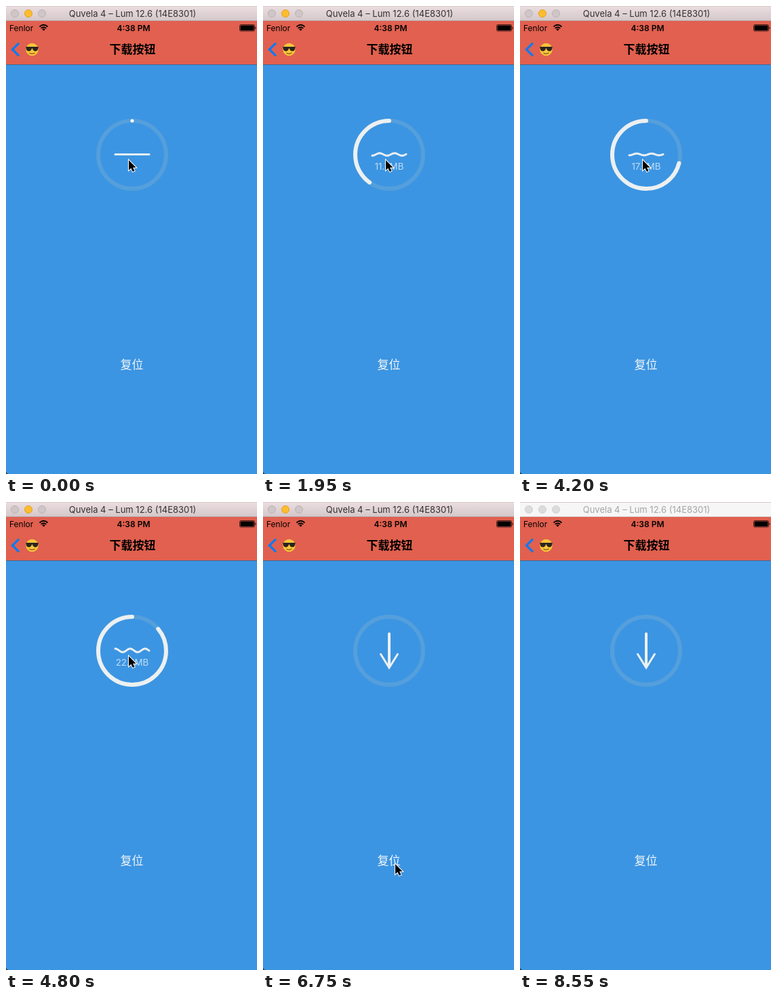
An HTML page for the animation above (8650 ms loop, 370 by 689 pixels).

```html
<!DOCTYPE html>
<html lang="zh-CN">
<head>
<meta charset="utf-8">
<title>下载按钮</title>
<style>
  html, body { margin: 0; width: 100%; height: 100%; overflow: hidden; background: #3c95e2; }
  svg { display: block; width: 370px; height: 689px; font-family: Inter, "Noto Sans CJK SC", "Noto Sans CJK", sans-serif; }
  .mid { text-anchor: middle; }
  .line { fill: none; stroke: #ecf0f1; stroke-linecap: round; }
  .light { fill: #cfc6c8; stroke: #bcb2b5; }
  .minimise { fill: #fdbd2f; stroke: #e0a023; }
  #bar { fill: url(#metal); }
  #edge { fill: #b9abad; }
  #caption { fill: #342f31; }
  .inactive .light { fill: #dcdcdc; stroke: #cfcfcf; }
  .inactive #bar { fill: #f6f6f6; }
  .inactive #edge { fill: #d8d4d4; }
  .inactive #caption { fill: #a4a4a4; }
</style>
</head>
<body>
<svg viewBox="0 0 370 689">
  <defs>
    <linearGradient id="metal" x2="0" y2="1">
      <stop stop-color="#ebdddf"/><stop offset="1" stop-color="#d3c7c9"/>
    </linearGradient>
  </defs>
  <rect width="370" height="689" fill="#3c95e2"/>

  <g id="window">
    <rect width="370" height="1" fill="#d8c8ca"/>
    <rect id="bar" y="1" width="370" height="21"/>
    <rect id="edge" y="21" width="370" height="1"/>
    <circle class="light" cx="13" cy="11" r="5.5"/>
    <circle class="light minimise" cx="33" cy="11" r="5.5"/>
    <circle class="light" cx="53" cy="11" r="5.5"/>
    <text id="caption" class="mid" x="186.5" y="16" font-size="13">Quvela 4 – Lum 12.6 (14E8301)</text>
  </g>

  <rect y="22" width="370" height="64" fill="#e1604f"/>
  <path d="M0 86.5H370" stroke="#356f9f"/>
  <text x="5" y="36.5" font-size="12">Fenlor</text>
  <g fill="none" stroke="#000" stroke-width="1.8">
    <path d="M49.5 30.5Q55.5 25 61.5 30.5M51.7 32.9Q55.5 29.6 59.3 32.9"/>
    <path d="M53.2 34.2Q55.5 32.5 57.8 34.2L55.5 36.6Z" fill="#000" stroke="none"/>
  </g>
  <text class="mid" x="188" y="36.5" font-size="12" font-weight="600">4:38 PM</text>
  <rect x="344.5" y="27.5" width="22" height="9.5" rx="1.8" fill="none" stroke="#200c09" stroke-width=".8"/>
  <rect x="345.5" y="28.5" width="20" height="7.5" rx="1"/>
  <path d="M367.5 30.5Q369.5 32.3 367.5 34Z"/>

  <path d="M19 54.7L9.5 64L19 73.3" fill="none" stroke="#087bf7" stroke-width="3.2"/>
  <circle cx="38.5" cy="64" r="9.2" fill="#f8c63a"/>
  <path d="M29.3 60H47.7L47 64Q45.8 67 42.5 66.5Q40 66 38.8 62.2H38.2Q37 66 34.5 66.5Q31.2 67 30 64Z" fill="#2b2420"/>
  <path d="M34.5 69.3Q38.5 71.5 42.5 69" fill="none" stroke="#78451c" stroke-width="1.2"/>
  <text class="mid" x="186.5" y="70" font-size="17" font-weight="700">下载按钮</text>

  <circle cx="186" cy="219" r="50" fill="none" stroke="#549fdc" stroke-width="6"/>
  <circle id="dot" cx="186" cy="169" r="2.5" fill="#fff"/>
  <path id="ring" class="line" stroke-width="6" pathLength="360"
        d="M186 169A50 50 0 1 0 186 269A50 50 0 1 0 186 169"/>
  <path id="mark" class="line" stroke-width="3"/>
  <g id="arrow" class="line">
    <path d="M186 194V242" stroke-width="4"/>
    <path d="M173.5 224L186 244L198.5 224" stroke-width="3"/>
  </g>
  <text id="size" class="mid" x="186" y="241" font-size="13.3" fill="#fff" fill-opacity=".68"></text>
  <text class="mid" x="185.5" y="534" font-size="17" fill="#f4f7f9">复位</text>

  <path id="cursor" d="M0 0V14.8L3.4 11.7L5.9 17L8.5 15.8L6.1 10.7H10.6Z"
        stroke="#fff" stroke-width="2" paint-order="stroke"/>
  <path d="M0 685V689H4Q.5 688.5 0 685Z" fill="#26333f"/>
</svg>

<script>
const LOOP = 8650, STEP = 150;
const START = 150, PAUSE = 2700, RESUME = 4050, DONE = 5100, RESET = 6750;
const $ = id => document.getElementById(id);
const mix = (a, b, k) => a + (b - a) * k;
const phase = (t, from, to) => Math.max(0, Math.min(1, (t - from) / (to - from)));
const smooth = k => k * k * (3 - 2 * k);
const easeOut = k => Math.sin(k * Math.PI / 2);

// The download runs in two stretches with a pause between them.
const first = t => phase(t, START, PAUSE);
const second = t => phase(t, RESUME, DONE);
const ringAngle = t => 252.6 * first(t) ** 1.6 + 107.4 * second(t) ** 1.86;
const megabytes = t => 16.6 * first(t) + 8 * second(t);

function wavePath(t) {
  const swell = t <= PAUSE ? phase(t, START, 300) : phase(t, RESUME, 4350);
  const height = 2.6 * swell * Math.cos((t - 1200) / 1200 * 2 * Math.PI);
  let d = "";
  for (let x = 161; x <= 211; x++) {
    const y = 218.5 - height * Math.cos((x - 161) / 22 * 2 * Math.PI);
    d += (d ? "L" : "M") + x + " " + y.toFixed(2);
  }
  return d;
}

function checkPath(t) {
  const k = smooth(phase(t, DONE, 5700));
  return `M${mix(161, 171, k)} 219L${mix(186, 181, k)} ${mix(219, 231.5, k)}` +
         `L${mix(211, 201.5, k)} ${mix(219, 204, k)}`;
}

// Four glides, each slowing down towards its stop.
const glides = [
  { from: 5250, to: 5850, x: 314, y: 491 },
  { from: 5850, to: 6450, x: 195, y: 533 },
  { from: 6750, to: 7200, x: 273, y: 524 },
  { from: 7350, to: 7800, x: 338, y: 660 }
];

function pointer(t) {
  let x = 181, y = 227;
  for (const glide of glides) {
    const k = easeOut(phase(t, glide.from, glide.to));
    x = mix(x, glide.x, k);
    y = mix(y, glide.y, k);
  }
  return `translate(${x} ${y})`;
}

function draw(now) {
  const t = Math.floor(now % LOOP / STEP) * STEP;
  const show = (id, on) => $(id).setAttribute("visibility", on ? "visible" : "hidden");

  $("window").setAttribute("class", t >= 8550 ? "inactive" : "");
  $("ring").setAttribute("stroke-dasharray", `${ringAngle(t) + .01} 400`);
  $("mark").setAttribute("d", t <= DONE ? wavePath(t) : checkPath(t));
  $("size").textContent = megabytes(t).toFixed(1) + "MB";
  $("cursor").setAttribute("transform", pointer(t));

  show("dot", t < START);
  show("ring", t >= START && t < RESET);
  show("mark", t < RESET);
  show("arrow", t >= RESET);
  show("size", t > START && t <= DONE);
  show("cursor", t < 7950);
}

let start;
function tick(now) {
  start ??= now;
  draw(now - start);
  requestAnimationFrame(tick);
}
draw(0);
requestAnimationFrame(tick);
</script>
</body>
</html>
```
